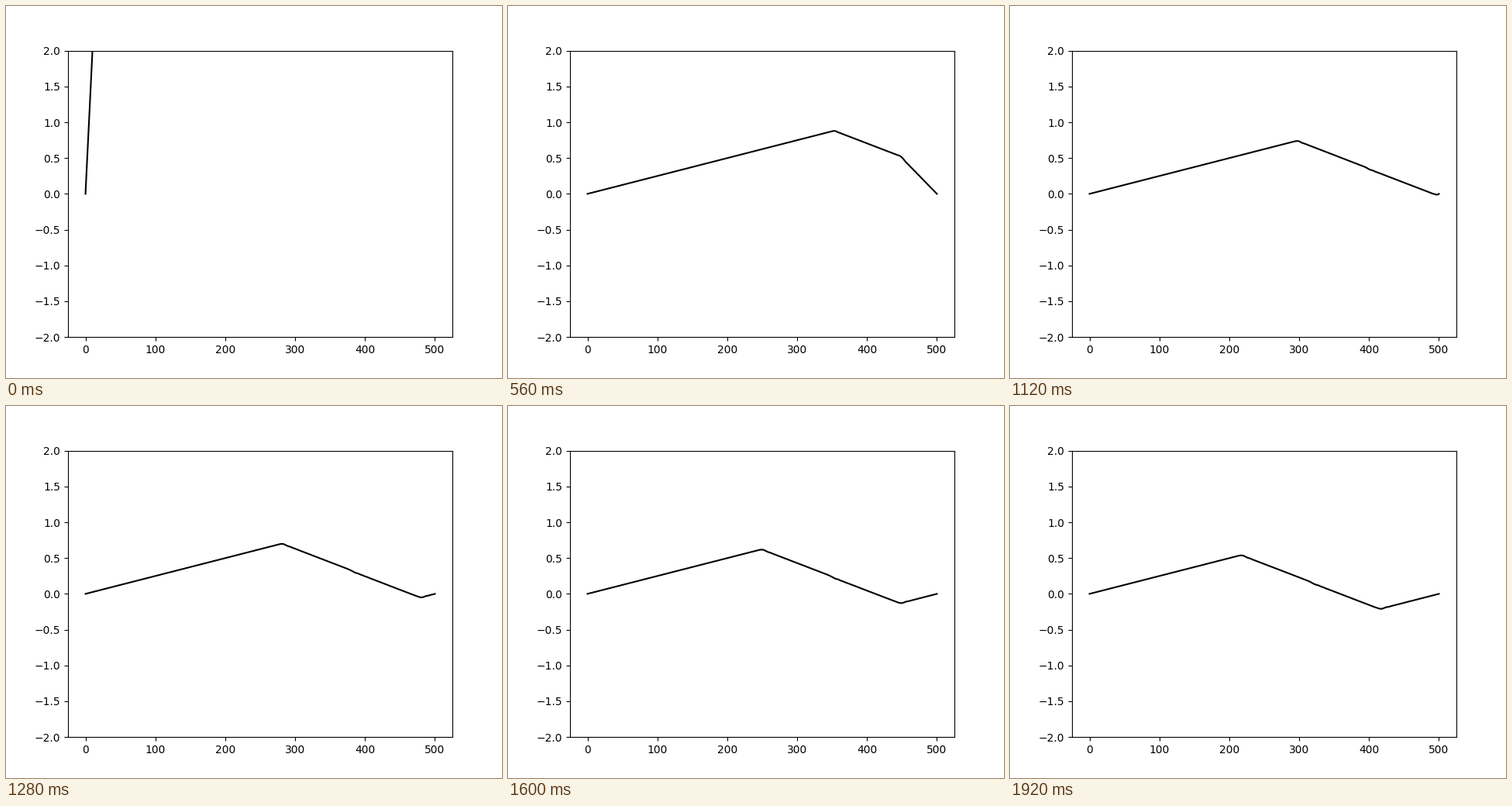
A matplotlib script that plays this animation: 640 by 480 pixels, repeating every 2 s.

```python
import numpy as np
import matplotlib.pyplot as plt
from matplotlib.animation import FuncAnimation

N = 500            # cells along the string
FRAMES = 25
INTERVAL = 80      # ms
STEPS = 80         # time steps per frame
COURANT = 0.1      # wave speed * dt / dx


def plucked(n=N, peak=400):
    """Triangular pluck, fixed at both ends."""
    i = np.arange(n + 1)
    y = np.where(i <= peak, i / peak, 1 - (i - peak - 1) / (n - peak))
    y[0] = y[-1] = 0
    return y


def simulate(y, count):
    """Leapfrog solution of the wave equation, sampled every STEPS steps."""
    r = COURANT ** 2

    def bend(u):
        out = np.zeros_like(u)
        out[1:-1] = u[2:] - 2 * u[1:-1] + u[:-2]
        return out

    prev, cur = y, y + 0.5 * r * bend(y)
    shapes = [prev]
    for _ in range(count - 1):
        for _ in range(STEPS):
            prev, cur = cur, 2 * cur - prev + r * bend(cur)
        shapes.append(prev)
    return shapes


x = np.linspace(0, 100, N + 1)
shapes = [x] + simulate(plucked(), FRAMES - 1)

fig, ax = plt.subplots(figsize=(6.4, 4.8), dpi=100)
line, = ax.plot(x, color="k")
ax.set_ylim(-2, 2)


def animate(frame):
    line.set_ydata(shapes[frame])
    return line,


anim = FuncAnimation(fig, animate, frames=FRAMES, interval=INTERVAL,
                     repeat=True, repeat_delay=0)
plt.show()
```
